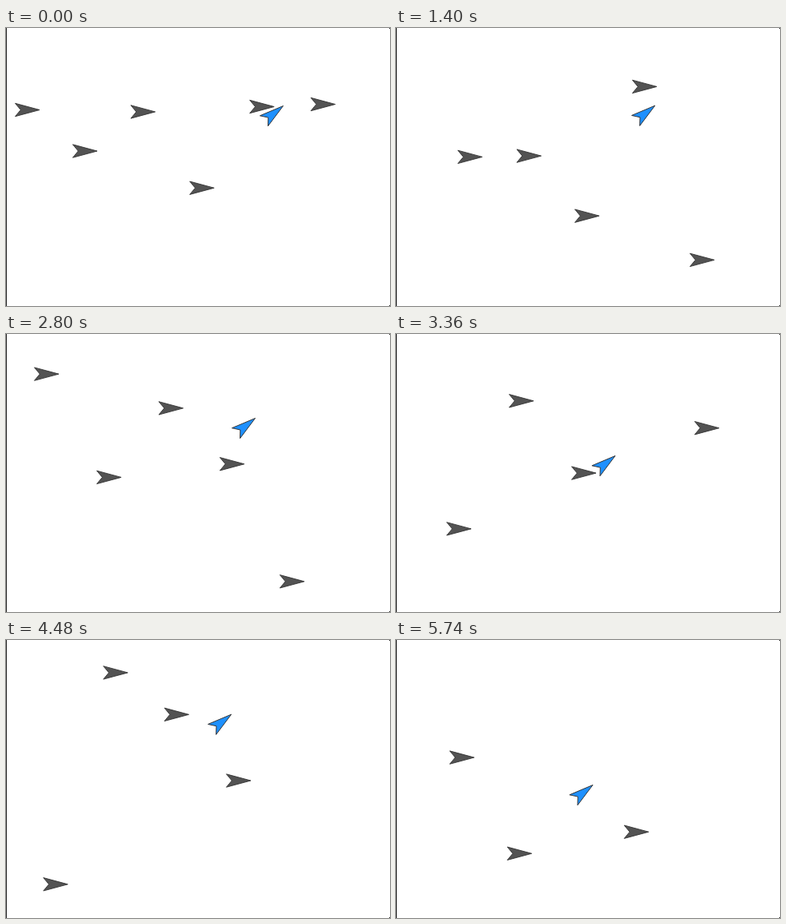
An HTML page with a canvas that plays this animation: 480 px wide and 348 px high, repeating every 5810 ms.

```html
<!DOCTYPE html>
<html lang="en">
<head>
<meta charset="utf-8">
<title>Arrow chase</title>
<style>
  html, body { margin: 0; width: 100%; height: 100%; overflow: hidden; background: #fff; }
  canvas { display: block; }
</style>
</head>
<body>
<canvas id="stage" width="480" height="348"></canvas>
<script>
const ctx = document.getElementById('stage').getContext('2d');
const LOOP = 5810, TICK = 70;
const START_X = 42, TRAVEL = 400;
const SPEED = .1893, CATCH_RADIUS = 18;
const ON_STAGE_AT_START = 5;

// Start and finish height of each grey arrow, in order of appearance.
const lanes = [
  [95, 95], [98, 98], [131, 257], [129, 61], [119, 311], [102, 61], [170, 292],
  [221, 45], [124, 348], [271, 101], [8, 196], [184, 164], [42, 169], [260, 132],
  [104, 80], [9, 123], [315, 205], [234, 170], [314, 166], [141, 181]
];

// Turning points of the blue arrow: [time, x, y].
const turns = [
  [0, 346.5, 97], [560, 310, 63], [770, 294, 98], [2170, 360, 95], [2310, 358, 82],
  [3080, 285, 118], [3360, 274, 152], [3920, 289, 159], [4130, 301, 122],
  [4690, 270, 75], [5040, 258, 49], [5740, 246, 181]
];

// Distance flown since the loop began, with a short burst at the start.
const flown = t => SPEED * t + 19 * (1 - Math.exp(-t / 100));

// Arrows leave at a nearly even spacing that drifts slowly.
const birth = n => 75 * n - 7 * Math.sin(.45 * n);

function hunterAt(t) {
  const next = turns.findIndex(([time]) => time >= t);
  if (next === 0) return { x: turns[0][1], y: turns[0][2] };
  const [t0, x0, y0] = turns[next - 1], [t1, x1, y1] = turns[next];
  const k = (t - t0) / (t1 - t0);
  return { x: x0 + (x1 - x0) * k, y: y0 + (y1 - y0) * k };
}

function runnerAt(index, t) {
  const [from, to] = lanes[index];
  const run = flown(t) - birth(index - ON_STAGE_AT_START);
  return {
    x: START_X + run,
    y: from + (to - from) * run / TRAVEL,
    visible: run > -4 && run <= TRAVEL
  };
}

// The blue arrow's body lies below its tip, the grey ones' level with it.
function isCaught(index, t) {
  const runner = runnerAt(index, t), hunter = hunterAt(t);
  return runner.visible &&
    Math.hypot(runner.x - hunter.x, runner.y - hunter.y - 12) < CATCH_RADIUS;
}

const catchTimes = lanes.map((_, index) => {
  for (let t = TICK; t < LOOP - TICK / 2; t += TICK) if (isCaught(index, t)) return t;
  return Infinity;
});

function drawArrow({ x, y }, degrees, fill) {
  ctx.save();
  ctx.translate(x, y + .5);
  ctx.rotate(degrees * Math.PI / 180);
  ctx.beginPath();
  ctx.moveTo(0, 0);
  ctx.lineTo(-30.5, -8.2);
  ctx.lineTo(-23.7, 0);
  ctx.lineTo(-30.5, 8.2);
  ctx.closePath();
  ctx.fillStyle = fill;
  ctx.fill();
  ctx.strokeStyle = '#333';
  ctx.lineWidth = .9;
  ctx.lineJoin = 'round';
  ctx.stroke();
  ctx.restore();
}

function drawWindowEdge() {
  ctx.fillStyle = '#222';
  ctx.fillRect(0, 0, 1, 348);
  ctx.fillRect(479, 0, 1, 1);
  ctx.fillRect(479, 347, 1, 1);
}

function render(now) {
  const t = Math.floor(now % LOOP / TICK) * TICK;
  ctx.fillStyle = '#fff';
  ctx.fillRect(0, 0, 480, 348);
  drawWindowEdge();

  lanes.forEach((_, index) => {
    const runner = runnerAt(index, t);
    if (runner.visible && t < catchTimes[index]) drawArrow(runner, 0, '#535353');
  });
  drawArrow(hunterAt(t), -38, '#1e90ff');
}

const start = performance.now();
function loop() {
  render(performance.now() - start);
  requestAnimationFrame(loop);
}
loop();
</script>
</body>
</html>
```
